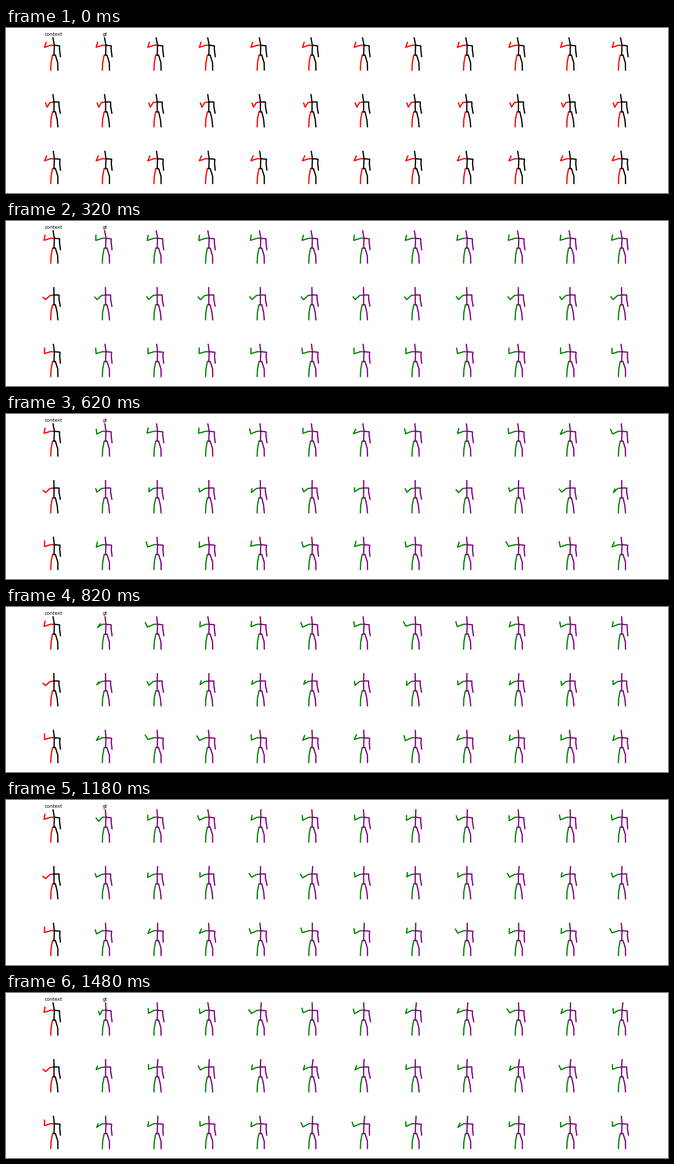
Recreate the animation shown at these times as a matplotlib script. Size 1280 px wide and 320 px high, loop 1500 ms.

```python
import numpy as np
import matplotlib.pyplot as plt
from matplotlib.animation import FuncAnimation

W, H, DPI = 1280, 320, 100
COLS, ROWS = 12, 3
COL_STEP, ROW_STEP = 99.78, 110
FRAMES, INTERVAL = 75, 20
OBSERVED = 15                    # frames of known motion before prediction starts
LAST = OBSERVED - 1
SEED = 5
GAP = (np.nan, np.nan)

time = np.arange(FRAMES)
past = np.minimum(time, LAST)
ahead = np.maximum(time - LAST, 0)
progress = ahead / (FRAMES - OBSERVED)
PAST_KEYS = [0, 11, LAST]
TRUTH_KEYS = [LAST, 22, 31, 41, 59, 74]

# Per row: joints in cell pixels; elbow and reach as (first, last observed);
# swing is the forearm's angle from upright, in degrees.
BODIES = [
    dict(neck=(93, 33), shoulder=(86, 33),
         right_arm=[(103, 34), (103, 41), (104.7, 55)], knees=(86.7, 99.5),
         head=(90.3, 90.5), elbow=[(74, 37), (73, 37)], reach=(10, 10),
         swing=(18, 27, 11), truth=(-24, -6, 36, -39, -18),
         truth_elbow=(81, 42), mean_elbow=(75, 39)),
    dict(neck=(92.3, 33), shoulder=(84.5, 34),
         right_arm=[(102, 33), (102, 41), (104.4, 54.7)], knees=(86.5, 98.5),
         head=(90.3, 92), elbow=[(79, 43), (76, 42)], reach=(8.5, 6.5),
         swing=(-20, -42, -48), truth=(-37, -18, 37, -18, 21),
         truth_elbow=(74, 38), mean_elbow=(75, 38.5)),
    dict(neck=(93, 33), shoulder=(86, 33),
         right_arm=[(104, 34), (103.3, 42), (104.7, 55)], knees=(86.7, 99.7),
         head=(91, 91.2), elbow=[(74, 37), (74, 36.5)], reach=(10, 10.5),
         swing=(24, 11, 0), truth=(-22, 13, 32, -17, 23),
         truth_elbow=(75, 40), mean_elbow=(74.5, 38.7)),
]


def blend(start, last, end):
    """Track through the observed frames to the end of the prediction."""
    return np.interp(time, [0, LAST, FRAMES - 1], [start, last, end])


def wander(rng, size):
    """Smooth seeded motion that starts from rest."""
    waves = sum(np.sin(2 * np.pi * ahead / rng.uniform(low, 2 * low)
                       + rng.uniform(0, 2 * np.pi)) for low in (22, 40))
    return size * waves * (1 - np.exp(-ahead / 7))


class Figure:
    def __init__(self, ax, row, col):
        self.body = BODIES[row]
        self.origin = np.array([COL_STEP * col, ROW_STEP * row])
        self.predicted = col > 0
        self.sway = np.zeros(FRAMES)
        self.plan(col, np.random.default_rng(SEED + row * COLS + col))
        style = dict(lw=2.4 * 72 / DPI, solid_capstyle="projecting",
                     solid_joinstyle="round")
        self.left, = ax.plot([], [], **style)
        self.right, = ax.plot([], [], **style)

    def plan(self, col, rng):
        """Work out the tracks of head, elbow and wrist for the whole loop."""
        b = self.body
        swing = np.interp(past, PAST_KEYS, b["swing"])
        elbow_end, reach_end, head_end = b["elbow"][1], b["reach"][1], b["head"][1]
        if col == 1:
            keyed = np.interp(time, TRUTH_KEYS, [b["swing"][-1], *b["truth"]])
            swing = np.where(time > LAST, keyed, swing)
            elbow_end, reach_end, head_end = b["truth_elbow"], 7, 92.3
        elif col > 1:
            swing = -3 + (swing + 3) * np.exp(-ahead / 8) + wander(rng, 17)
            elbow_end, reach_end = b["mean_elbow"], 8.8
            head_end = rng.normal(92.8, 1)
            self.sway = rng.uniform(-1, 1) * progress
        (x0, y0), (x1, y1) = b["elbow"]
        self.head = blend(*b["head"], head_end)
        self.ex = blend(x0, x1, elbow_end[0])
        self.ey = blend(y0, y1, elbow_end[1])
        if col > 1:
            self.ex = self.ex + wander(rng, 0.7)
            self.ey = self.ey + wander(rng, 0.7)
        reach = blend(*b["reach"], reach_end)
        angle = np.radians(swing)
        self.wx = self.ex + reach * np.sin(angle)
        self.wy = self.ey - reach * np.cos(angle)

    def place(self, line, points, color):
        x, y = (np.array(points, float) + self.origin).T
        line.set_data(x, y)
        line.set_color(color)

    def update(self, frame):
        f = frame if self.predicted else min(frame, LAST)
        b = self.body
        neck, pelvis = b["neck"], (92.3, 52)
        upper, bend, (hx, hy) = b["right_arm"]
        left_knee, right_knee = b["knees"]
        left = [neck, b["shoulder"], (self.ex[f], self.ey[f]),
                (self.wx[f], self.wy[f]), GAP,
                pelvis, (89.5, 52), (left_knee, 67), (86, 81)]
        right = [(self.head[f], 18.8), neck, pelvis, GAP,
                 neck, upper, bend, (hx + self.sway[f], hy), GAP,
                 pelvis, (95, 52), (right_knee, 67), (99.8, 81)]
        guess = self.predicted and frame >= OBSERVED
        self.place(self.left, left, "green" if guess else "red")
        self.place(self.right, right, "purple" if guess else "black")


fig = plt.figure(figsize=(W / DPI, H / DPI), dpi=DPI, facecolor="white")
ax = fig.add_axes([0, 0, 1, 1])
ax.set_xlim(-0.5, W - 0.5)
ax.set_ylim(H - 0.5, -0.5)
ax.axis("off")

for col, title in enumerate(["context", "gt"]):
    ax.text(90.8 + COL_STEP * col, 14.3, title, ha="center", va="baseline",
            family="DejaVu Sans", size=9 * 72 / DPI, color="black")

figures = [Figure(ax, r, c) for r in range(ROWS) for c in range(COLS)]


def update(frame):
    for figure in figures:
        figure.update(frame)
    return []


anim = FuncAnimation(fig, update, frames=FRAMES, interval=INTERVAL,
                     init_func=lambda: update(0), repeat=True,
                     repeat_delay=0, blit=False)
plt.show()
```
